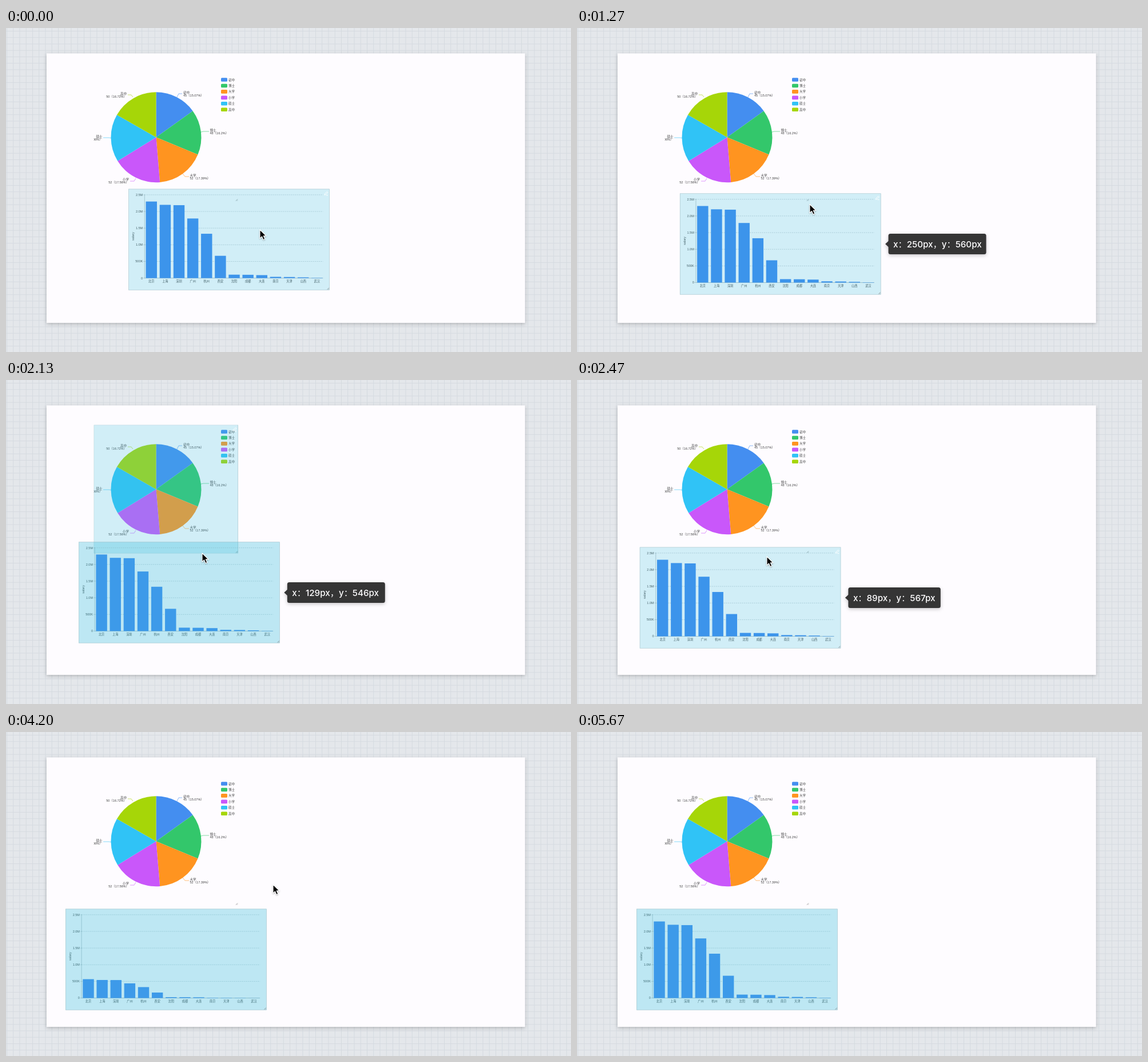
Recreate the animation shown at these times as an HTML page. Size 988 px wide and 567 px high, loop 5740 ms.

```html
<!DOCTYPE html>
<html lang="zh">
<head>
<meta charset="utf-8">
<title>Dashboard editor</title>
<style>
html, body { margin: 0; width: 100%; height: 100%; overflow: hidden; background: #e4e7eb; }
svg { display: block; width: 988px; height: 567px; font-family: Inter, "Noto Sans CJK SC", "Noto Sans CJK", sans-serif; }
.small { font-family: "Liberation Sans", "Noto Sans CJK SC", "Noto Sans CJK", sans-serif; font-size: 5.5px; fill: #444; }
</style>
</head>
<body>
<svg id="root" viewBox="0 0 988 567">
  <defs>
    <pattern id="grid" width="11.25" height="11.25" patternUnits="userSpaceOnUse" x="1" y="5">
      <path d="M.5 0V11.25M0 .5H11.25" stroke="#d5dae0" fill="none"/>
    </pattern>
    <filter id="soft" x="-10%" y="-30%" width="120%" height="160%">
      <feDropShadow dx="0" dy="2" stdDeviation="3" flood-color="#000" flood-opacity=".22"/>
    </filter>
    <filter id="cursorShadow" x="-50%" y="-50%" width="200%" height="200%">
      <feDropShadow dx="0" dy="1" stdDeviation="1" flood-color="#000" flood-opacity=".35"/>
    </filter>
    <clipPath id="pieClip"><rect x="153.5" y="78.5" width="252.5" height="225"/></clipPath>
  </defs>
  <rect width="988" height="567" fill="#e4e7eb"/>
  <rect width="988" height="567" fill="url(#grid)"/>
  <rect x="71" y="44.5" width="836.5" height="471.5" fill="#fefcff" filter="url(#soft)"/>
  <g id="pie" clip-path="url(#pieClip)"></g>
  <g id="bar"></g>
  <g id="guides" stroke="#efbe1c" stroke-width="1.5">
    <path id="guideV"/><path id="guideH"/>
  </g>
  <g id="tip" filter="url(#soft)">
    <path d="M0 18L6.5 12V24Z" fill="#353436"/>
    <rect id="tipBox" x="5.5" width="171" height="36" rx="3.5" fill="#353436"/>
    <text id="tipText" x="14" y="24.3" font-size="15.2" font-weight="500" fill="#fff"></text>
  </g>
  <path id="cursor" d="M0 0V15.2L3.5 11.9L6 17.6L8.7 16.4L6.3 10.9H11Z" fill="#000"
    stroke="#fff" stroke-width="1.1" stroke-linejoin="round" filter="url(#cursorShadow)"/>
</svg>
<script>
const LOOP = 5740, STEP = 200 / 3, SCALE = 2.295;
const CARD = { w: 351.5, h: 177 };
const PIE = { x: 153.5, y: 78.5, w: 252.5, h: 225 };
const TINT = "#3fbfdb";
const $ = id => document.getElementById(id);

function add(parent, tag, attrs, text) {
  const el = document.createElementNS("http://www.w3.org/2000/svg", tag);
  for (const key in attrs) el.setAttribute(key, attrs[key]);
  if (text) el.textContent = text;
  parent.appendChild(el);
  return el;
}
const label = (parent, x, y, text, anchor = "start", extra = {}) =>
  add(parent, "text", { x, y, class: "small", "text-anchor": anchor, ...extra }, text);

// Tint, corner grip and edit icon shared by both cards
function addChrome(parent, { x, y, w, h }) {
  const tint = add(parent, "rect", { x, y, width: w, height: h, fill: TINT });
  const border = add(parent, "rect", { x: x + .3, y: y + .3, width: w - .6, height: h - .6, fill: "none", stroke: "#9db8bf", "stroke-width": .6 });
  const right = x + w, bottom = y + h;
  add(parent, "path", { d: `M${right - 4} ${bottom - 1}l3 -3M${right - 2} ${bottom - 1}l1 -1`, stroke: "#777", "stroke-width": .7 });
  const icon = add(parent, "path", { d: `M${right - 9} ${y + 10.5}l.6 -2l3.8 -3.8l1.5 1.5l-3.8 3.8zM${right - 6} ${y + 11}h3`, fill: "none", stroke: "#fff", "stroke-width": .9 });
  return state => {
    tint.setAttribute("opacity", { none: 0, hover: .23, selected: .34 }[state]);
    border.setAttribute("opacity", state === "none" ? 0 : .8);
    icon.setAttribute("opacity", state === "hover" ? 1 : 0);
  };
}

function buildPie(g) {
  const cx = 262.5, cy = 191.3, r = 79;
  const slices = [
    ["初中", 45, 15.07, "#448ef0", 310, 114.5, "start", "M299 121L302 115H308"],
    ["博士", 48, 16.2, "#33c76b", 356.5, 181, "start", "M341 182L345 181H355"],
    ["大学", 52, 17.39, "#ff9420", 321.5, 260, "start", "M309 255L313 260H320"],
    ["小学", 52, 17.56, "#c957fa", 215, 267.2, "end", "M227 263L224 268H217"],
    ["硕士", 51, 17.06, "#30c3f6", 168.5, 192, "end", "M184 192.5L180 192H170"],
    ["高中", 50, 16.72, "#a6d608", 211, 117, "end", "M222 121L219 117H213"]
  ];
  const point = a => `${cx + r * Math.sin(a)} ${cy - r * Math.cos(a)}`;
  let angle = 0;
  slices.forEach(([name, count, percent, fill, x, y, anchor, leader], i) => {
    const end = angle + percent / 100 * 2 * Math.PI;
    add(g, "path", { d: `M${cx} ${cy}L${point(angle)}A${r} ${r} 0 0 1 ${point(end)}Z`, fill });
    angle = end;
    add(g, "path", { d: leader, fill: "none", stroke: fill, "stroke-width": .6 });
    label(g, x, y, name, anchor);
    label(g, x, y + 5.2, `${count}（${percent}%）`, anchor);
    const ly = 90.5 + i * 10.45;
    add(g, "rect", { x: 376, y: ly - 3.3, width: 11, height: 6.6, rx: 1.5, fill });
    label(g, 389, ly + 2, name);
  });
  return addChrome(g, PIE);
}

const bars = [];
function buildBars(g) {
  const base = 156;
  const cities = "北京 上海 深圳 广州 杭州 西安 沈阳 成都 大连 南京 天津 山西 武汉".split(" ");
  const heights = [134, 128.2, 127.6, 104.3, 77.6, 39, 6, 5.8, 5.2, 2.2, 1.9, 1.3, .5];
  ["0", "500K", "1.0M", "1.5M", "2.0M", "2.5M"].forEach((text, i) => {
    const y = base - i * 29.15;
    add(g, "path", { d: `M28 ${y}H340`, stroke: i ? "#b4bfc6" : "#9aa5ab", "stroke-width": .7, "stroke-dasharray": i ? "2 1.5" : "none" });
    add(g, "path", { d: `M26 ${y}h2`, stroke: "#9aa5ab", "stroke-width": .6 });
    label(g, 24.8, y + 1.9, text, "end");
  });
  add(g, "path", { d: `M28 10V${base}`, stroke: "#9aa5ab", "stroke-width": .6 });
  label(g, 0, 0, "salary", "middle", { transform: "translate(10 83) rotate(-90)" });
  cities.forEach((city, i) => {
    const x = 30.2 + i * 24.13;
    bars.push({ base, height: heights[i], el: add(g, "rect", { x, width: 19.4, fill: "#3c87ef" }) });
    label(g, x + 9.7, 163.8, city, "middle", { style: "font-size:5.2px" });
  });
  return addChrome(g, { x: 0, y: 0, ...CARD });
}

// Keys: [time, x, y]; card positions are in canvas pixels shown by the tip
const cardKeys = [
  [730, 329, 542], [1200, 252, 558], [1270, 250, 560], [1460, 189, 553], [1600, 189, 552],
  [1800, 138, 548], [2130, 129, 546], [2400, 92, 562], [2470, 89, 567], [2770, 76, 598], [2900, 76, 606]
];
const cursorKeys = [
  [0, 444, 353], [150, 444, 353], [600, 437, 306], [730, 436, 300], [1200, 408, 308], [1270, 407, 308.5],
  [1800, 352, 304.5], [2130, 343, 303], [2470, 332, 309], [2930, 327, 322], [3740, 327, 322],
  [3960, 405, 312], [4200, 467, 267], [4800, 586, 42], [5000, 591, 26]
];
function sample(keys, t) {
  if (t <= keys[0][0]) return keys[0].slice(1);
  const i = keys.findIndex(k => k[0] > t);
  if (i < 0) return keys[keys.length - 1].slice(1);
  const [a, b] = [keys[i - 1], keys[i]];
  const p = (t - a[0]) / (b[0] - a[0]);
  return [1, 2].map(n => a[n] + (b[n] - a[n]) * p);
}

const setPie = buildPie($("pie")), setBar = buildBars($("bar"));
const show = (el, on) => el.setAttribute("visibility", on ? "visible" : "hidden");
const inside = (x, y, r) => x >= r.x && x <= r.x + r.w && y >= r.y && y <= r.y + r.h;

function render(ms) {
  const t = Math.round(Math.floor((ms + 4) / STEP) * STEP / 10) * 10;
  const [x, y] = sample(cardKeys, t).map(Math.round);
  const card = { x: 71 + x / SCALE, y: 45.5 + y / SCALE, ...CARD };
  const [px, py] = sample(cursorKeys, t);

  $("bar").setAttribute("transform", `translate(${card.x} ${card.y})`);
  const overPie = inside(px, py, PIE) && t > 1270 && t < 3700;
  setPie(overPie ? "hover" : "none");
  setBar(!overPie && t < 5200 && inside(px, py, card) ? "hover" : "selected");

  const p = Math.min(1, Math.max(0, (t - 4110) / 1000));
  const grow = t < 4110 ? 1 : 1 - (1 - p) ** 3;
  for (const { el, base, height } of bars) {
    el.setAttribute("y", base - height * grow);
    el.setAttribute("height", height * grow);
  }

  const leftSnap = t >= 1460 && t <= 1600, centerSnap = t >= 2770 && t < 3740;
  show($("guideV"), leftSnap || centerSnap);
  show($("guideH"), centerSnap);
  $("guideV").setAttribute("d", `M${leftSnap ? PIE.x : 280.5} 44V516`);
  $("guideH").setAttribute("d", `M70 ${card.y + CARD.h / 2}H908`);

  show($("tip"), t >= 860 && t < 3740);
  $("tip").setAttribute("transform", `translate(${card.x + CARD.w + 7.6} ${card.y + CARD.h / 2 - 18})`);
  $("tipText").textContent = `x：${x}px，y：${y}px`;
  $("tipBox").setAttribute("width", 171 - 9.6 * (6 - `${x}${y}`.length));

  show($("cursor"), t < 5200);
  $("cursor").setAttribute("transform", `translate(${px} ${py})`);
}

const start = performance.now();
function tick() {
  render((performance.now() - start) % LOOP);
  requestAnimationFrame(tick);
}
tick();
</script>
</body>
</html>
```
